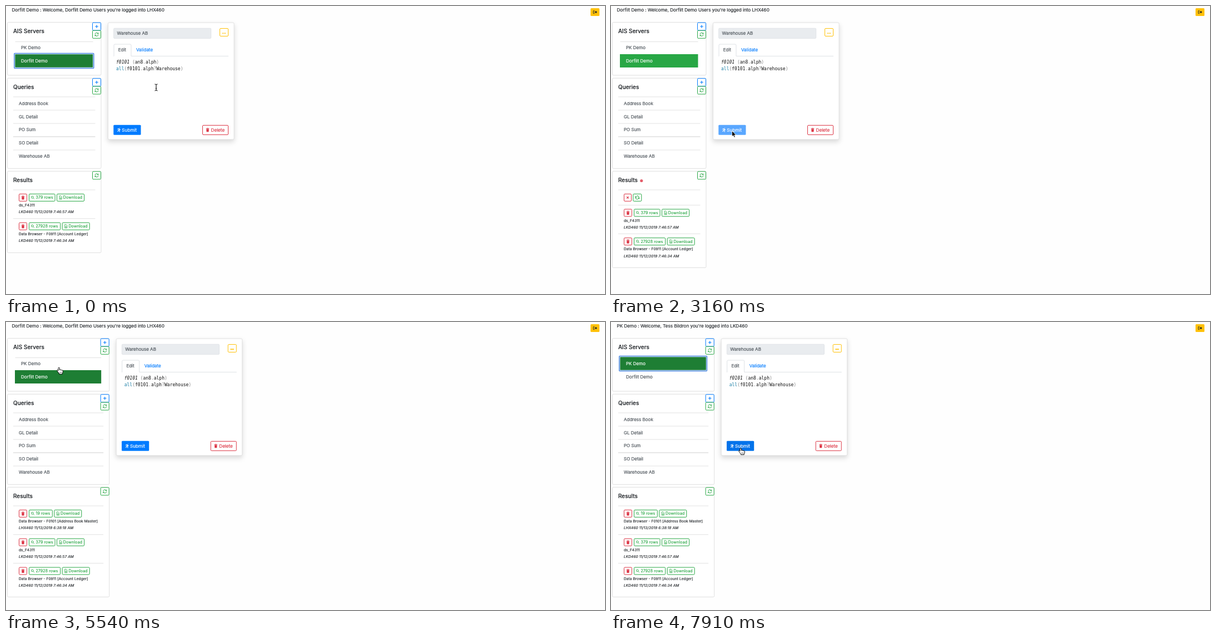
These frames come from a looping animation (1077 px wide and 520 px high, 8 s). An HTML page:

```html
<!DOCTYPE html>
<html lang="en">
<head>
<meta charset="utf-8">
<title>Query console</title>
<style>
  html, body { margin: 0; width: 100%; height: 100%; overflow: hidden; background: #fefefe; }
  svg { display: block; width: 100vw; height: 100vh; font-family: Inter, "Liberation Sans", sans-serif; }
  text { white-space: pre; stroke-width: .16px; }
  .code { font-family: "DejaVu Sans Mono", monospace; stroke: none; }
  .shadow { filter: drop-shadow(0 4px 4px rgba(0, 0, 0, .15)); }
</style>
</head>
<body>
<svg id="stage" viewBox="0 0 1077 520"></svg>
<script>
const LOOP = 8000;
const BLUE = '#007bff', GREEN = '#28a745', DARK_GREEN = '#1e7e34', RED = '#dc3545',
      YELLOW = '#ffc107', INK = '#212529', GRAY = '#495057', LINE = '#dfdfdf';
const stage = document.getElementById('stage');

// Icons are centred on 0,0; "fill" icons are solid, the others are stroked.
const ICONS = {
  plus: { d: 'M-2.8 0h5.6M0-2.8v5.6', w: 1.1 },
  sync: { d: 'M-3-.5a3 3 0 0 1 5.4-1.3M3-3.1v2h-2.1M3 .5a3 3 0 0 1-5.4 1.3M-3 3.1v-2h2.1', w: 1 },
  cross: { d: 'M-1.8-1.8l3.6 3.6M1.8-1.8l-3.6 3.6', w: 1.2 },
  search: { d: 'M1.3-.5a1.9 1.9 0 1 1-3.8 0a1.9 1.9 0 1 1 3.8 0M.9 1l2 2', w: .9 },
  file: { d: 'M-2.1-3.1h2.6l1.6 1.6v4.6h-4.2zM0-.8v2.6M-1.1.9l1.1 1.1 1.1-1.1', w: .8 },
  run: { d: 'M-2.7-.8l1-1.3h2.2l.8 1.7h1.4M.4-2l-.9 2.4 1.5 1v2.2M-.7.6l-.7 1.6h-1.7M1-3.4h.6', w: 1.1 },
  trash: { d: 'M-2.7-3h1.7l.3-.6h1.4l.3.6h1.7v.9h-5.4zM-2.3-1.6h4.6l-.3 5.1h-4z', fill: 1 },
  arrow: { d: 'M-1.4-.8h2v-1.6l2.7 2.4-2.7 2.4v-1.6h-2z', fill: 1 },
  door: { d: 'M-1-2.3h-2.2v4.6h2.2', w: .9 }
};

const CURSORS = {
  beam: '<path d="M-2.6-6q2.2 0 2.6 1.3q.4-1.3 2.6-1.3M0-5v10M-2.6 6q2.2 0 2.6-1.3q.4 1.3 2.6 1.3M-1.2 1.8h2.4" fill="none" stroke="#111" stroke-width="1.1"/>',
  arrow: '<path d="M-1.5-7.6v10.4l2.4-2.2 1.6 3.7 1.8-.8-1.6-3.5h3.2z" fill="#000" stroke="#fff" stroke-width=".8"/>',
  hand: '<path d="M-3-4.6a1.2 1.2 0 0 1 2.4 0v3.2l.3-.1a1.1 1.1 0 0 1 2 .4a1.1 1.1 0 0 1 1.9.4a1 1 0 0 1 1.7.8v2.4l-1 2.4v1.2h-5.8v-1.2l-2.3-2.9-1.4-2.2c-.5-1.1.7-1.7 1.4-1l.8.9z" fill="#fff" stroke="#000" stroke-width=".95"/><path d="M-.2 2.1v2.2M1.4 2.1v2.2M3 2.1v2.2" stroke="#000" stroke-width=".5"/>'
};

// time, x, y, shape: the pointer jumps at each step
const POINTER = [
  [0, 270, 147, 'beam'], [150, 267, 152, 'beam'], [300, 256, 173, 'beam'], [450, 240, 201, 'beam'],
  [600, 226, 221, 'hand'], [770, 220, 231, 'hand'], [920, 219, 234, 'hand'],
  [2710, 219, 233, 'arrow'], [4050, 219, 234, 'hand'],
  [5250, 198, 205, 'arrow'], [5400, 140, 134, 'arrow'], [5540, 97, 88, 'hand'],
  [5690, 83, 81, 'hand'], [5840, 79, 79.5, 'hand'],
  [6880, 103, 91, 'arrow'], [7030, 192, 136, 'arrow'], [7180, 231, 147, 'beam'],
  [7470, 232, 161, 'beam'], [7620, 233, 196, 'beam'], [7770, 235, 226, 'hand'], [7910, 235, 233.5, 'hand']
];

const SUBMIT = [
  [0, BLUE], [600, '#0074ef'], [770, '#0069d9'], [2270, '#0062cc'], [2710, '#5aa7ff'],
  [4050, '#1f80e6'], [4200, '#0069d9'], [5250, BLUE], [7910, '#0373ea']
];

const FIRST = 'PK Demo', SECOND = 'Dorfilt Demo';
const RESULTS = [
  ['19', 'Data Browser - F0101 [Address Book Master]', 'LHX460 11/13/2019 6:38:18 AM'],
  ['379', 'ds_F4311', 'LKD460 11/12/2019 7:46:57 AM'],
  ['27928', 'Data Browser - F0911 [Account Ledger]', 'LKD460 11/12/2019 7:46:34 AM']
];

const at = (keys, t) => keys.filter(k => k[0] <= t).pop();
const text = (x, y, s, fill = INK, size = 8, extra = '') =>
  `<text x="${x}" y="${y + size * .36}" font-size="${size}" fill="${fill}" stroke="${fill}" ${extra}>${s}</text>`;
const box = (x, y, w, h, fill, stroke = 'none', r = 1.5, extra = '') =>
  `<rect x="${x}" y="${y}" width="${w}" height="${h}" rx="${r}" fill="${fill}" stroke="${stroke}" ${extra}/>`;
const rule = (x, y, x2, color = '#e2e2e2') => `<path d="M${x} ${y}H${x2}" stroke="${color}"/>`;

function icon(name, x, y, color, turn = 0) {
  const { d, w, fill } = ICONS[name];
  const paint = fill ? `fill="${color}"` : `fill="none" stroke="${color}" stroke-width="${w}"`;
  return `<path d="${d}" transform="translate(${x} ${y}) rotate(${turn})" ${paint}/>`;
}

const iconButton = (name, x, y, w, h, color, turn) =>
  box(x, y, w, h, '#fff', color) + icon(name, x + w / 2, y + h / 2, color, turn);

function panel(title, y, h, d, hasAdd) {
  const x = 155.5 + d;
  return box(2.5, y, 168.5 + d, h, '#fff', LINE, 2) +
    text(13, y + 16, title, INK, 10, 'font-weight="500"') +
    (hasAdd ? iconButton('plus', x, y + .5, 15, 14, BLUE) : '') +
    iconButton('sync', x, y + (hasAdd ? 14.8 : .5), 15, 14, GREEN);
}

function servers(t, d) {
  const swapped = t >= 6280;
  const focus = t < 2120 ? 1 : t >= 6130 ? 0 : -1;
  const dark = focus >= 0 && (swapped || t < 2120) || t >= 5540 && t < 5690;
  const y = swapped ? 63 : 87;
  let s = panel('AIS Servers', 29.5, 95.5, d, true) + rule(16.5, 64.5, 156.5 + d);
  s += box(16, y, 140.5 + d, 24, dark ? DARK_GREEN : GREEN, 'none', 0);
  if (focus >= 0) {
    const ring = (inset, color, w) => box(14.8 + inset, 61.6 + inset + focus * 24,
      143 + d - 2 * inset, 26.8 - 2 * inset, 'none', color, 1, `stroke-width="${w}"`);
    s += ring(1.2, '#c9dcf5', .9) + ring(0, '#4f8ae2', 1.5);
  }
  return s + text(27, 75, FIRST, swapped ? '#fff' : GRAY) + text(27, 99, SECOND, swapped ? GRAY : '#fff');
}

function queries(d) {
  return panel('Queries', 130.3, 163, d, true) +
    ['Address Book', 'GL Detail', 'PO Sum', 'SO Detail', 'Warehouse AB'].map((name, i) =>
      rule(13, 164 + i * 24, 160.5 + d, i == 3 ? '#cfcfcf' : undefined) +
      text(23, 175.7 + i * 23.95, name, GRAY)).join('');
}

function result([count, name, date], y, d) {
  const w = 32.2 + 4.8 * count.length, x = 45 + w;
  const small = 'letter-spacing=".1"';
  return rule(13, y, 160.5 + d) +
    iconButton('trash', 23.5, y + 7.4, 14, 13, RED) +
    box(41.5, y + 7.4, w, 13, '#fff', GREEN) + icon('search', 48, y + 13.7, GREEN) +
    text(53.5, y + 13.9, count + ' rows', GREEN, 7, small) +
    box(x, y + 7.4, 49, 13, '#fff', GREEN) + icon('file', x + 6.6, y + 13.9, GREEN) +
    text(x + 11.2, y + 13.9, 'Download', GREEN, 7.1, small) +
    text(23, y + 27.8, name, INK, 6.5, small) +
    text(23, y + 40, date, INK, 6.5, 'letter-spacing=".13" font-style="italic"');
}

function results(t, d) {
  const pending = t >= 2710 && t < 3900, done = t >= 3900;
  const rows = done ? RESULTS : RESULTS.slice(1);
  let s = panel('Results', 298.3, done ? 198.2 : pending ? 174.2 : 147.2, d, false);
  if (pending) {
    const step = Math.floor((t - 2710) / 149);
    const glow = .8 + .2 * Math.cos((step - 3) * Math.PI / 3);
    s += `<circle cx="54.8" cy="315.5" r="2.6" fill="${RED}" opacity="${.8 * glow}"/>` +
      rule(13, 332, 160.5) + iconButton('cross', 23.5, 339.4, 13, 13, RED) +
      iconButton('sync', 39.8, 339.4, 15, 13, GREEN, 60 + (step - 3) * 54);
  }
  return s + rows.map((r, i) => result(r, 332 + (pending ? 27.5 : 0) + i * 51.8, d)).join('');
}

function editor(t, d) {
  const gray = s => `<tspan fill="#888">${s}</tspan>`;
  const ring = t >= 2270 && t < 2710 || t >= 4050 && t < 4200;
  return `<g transform="translate(${d})">` +
    box(183.5, 30, 226.5, 211, '#fff', LINE, 2, 'class="shadow"') +
    box(193.7, 40.2, 175, 18.3, '#e9ecef', '#e1e4e8') + text(199.5, 49.3, 'Warehouse AB', GRAY) +
    box(384.5, 40.5, 15, 14, '#fff', YELLOW) +
    `<path d="M388.6 49.2h6.6" stroke="${YELLOW}" stroke-width="1.5" ${d ? '' : 'stroke-dasharray="1.6 .9"'}/>` +
    rule(193.5, 90.5, 400, '#dee2e6') +
    '<path d="M194 90.5v-19.5q0-2 2-2h27q2 0 2 2v19.5" fill="#fff" stroke="#dee2e6"/>' + rule(194.5, 90.5, 224.5, '#fff') +
    text(201.7, 79.5, 'Edit', GRAY) + text(234, 79.5, 'Validate', BLUE) +
    text(198, 100.8, `<tspan font-style="italic">f0101</tspan> ${gray('(')}an8${gray('.')}alph${gray(')')}`, '#111', 8, 'class="code"') +
    text(198, 113, `<tspan fill="#1b7fa6">all</tspan>${gray('(')}f0101${gray('.')}alph${gray('?')}Warehouse${gray(')')}`, '#111', 8, 'class="code"') +
    (ring ? box(192.7, 214.2, 50.6, 19.2, 'none', '#92c7ff', 2.5, 'stroke-width="1.7"') : '') +
    box(193.3, 214.8, 49.2, 18, at(SUBMIT, t)[1]) + icon('run', 203.2, 223.8, '#fff') +
    text(208.3, 223.9, 'Submit', '#fff', 8.2) +
    box(353.5, 215.4, 46, 17, '#fff', RED) + icon('trash', 362.5, 223.8, RED) +
    text(368.6, 223.9, 'Delete', RED, 8.1) + '</g>';
}

function scene(t) {
  const d = t < 3900 ? 0 : 14.7;
  const greeting = t < 6280
    ? `${SECOND} : Welcome, ${SECOND} Users you're logged into LHX460`
    : `${FIRST} : Welcome, Tess Bildron you're logged into LKD460`;
  const [, x, y, shape] = at(POINTER, t);
  return text(10.5, 7, greeting, INK, 8.15) +
    box(1051, 4, 16, 14, YELLOW) + icon('door', 1059.3, 11, INK) + icon('arrow', 1059.6, 11, INK) +
    servers(t, d) + queries(d) + results(t, d) + editor(t, d) +
    `<g transform="translate(${x} ${y})">${CURSORS[shape]}</g>`;
}

const start = performance.now();
let shown = '';
function frame() {
  const next = scene((performance.now() - start) % LOOP);
  if (next !== shown) stage.innerHTML = shown = next;
  requestAnimationFrame(frame);
}
frame();
</script>
</body>
</html>
```
